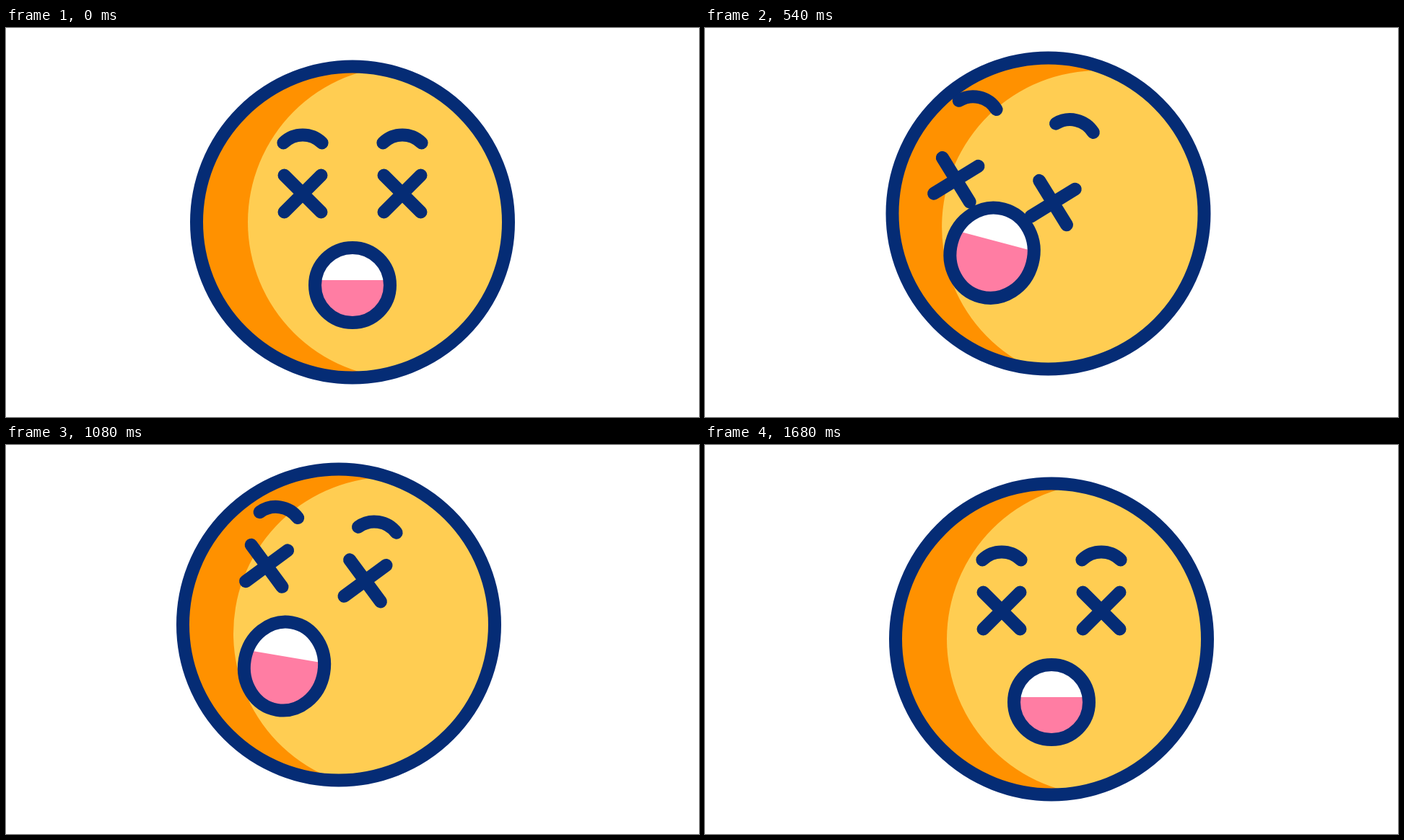
An HTML page with a canvas that plays this animation: 960x540 px, repeating every 1770 ms.

```html
<!DOCTYPE html>
<html lang="en">
<head>
<meta charset="utf-8">
<title>Dizzy face</title>
<style>
  html, body { margin: 0; width: 100%; height: 100%; overflow: hidden; background: #fff; }
  canvas { display: block; width: 960px; height: 540px; }
</style>
</head>
<body>
<canvas id="stage" width="960" height="540"></canvas>
<script>
const ctx = document.getElementById('stage').getContext('2d');
const NAVY = '#052c75', YELLOW = '#ffcd52', ORANGE = '#ff9100', PINK = '#ff7da3', WHITE = '#fff';
const LOOP = 1770, LAST_STEP = 37, WOUND = 6.8;
const RAD = Math.PI / 180, TAU = Math.PI * 2;

// The picture holds for 60, 40, 40 and 40 ms in turn.
function stepAt(ms) {
  const t = ms % LOOP, r = t % 180;
  const part = r < 60 ? 0 : 1 + Math.floor((r - 60) / 40);
  return Math.min(LAST_STEP, Math.floor(t / 180) * 4 + part);
}

function ease(n, from, to) {
  const u = Math.min(1, Math.max(0, (n - from) / (to - from)));
  return u * u * (3 - 2 * u);
}

// Offset that winds up, swings to the far side, then drifts back to zero.
function swing(n, wind, far, swingEnd, backStart, backEnd) {
  const out = ease(n, WOUND, swingEnd), back = ease(n, backStart, backEnd);
  return wind * (ease(n, 0, WOUND) - out) + far * (out - back);
}

function at(x, y, deg, draw) {
  ctx.save();
  ctx.translate(x, y);
  ctx.rotate(deg * RAD);
  draw();
  ctx.restore();
}

function ellipse(x, y, rx, ry) {
  ctx.beginPath();
  ctx.ellipse(x, y, rx, ry, 0, 0, TAU);
}

function fill(color) {
  ctx.fillStyle = color;
  ctx.fill();
}

function drawHead(turn) {
  ctx.save();
  ellipse(0, 0, 216, 216);
  fill(ORANGE);
  ctx.clip();
  ctx.rotate(turn * RAD);
  ellipse(72, 0, 217, 217);
  fill(YELLOW);
  ctx.restore();
  ellipse(0, 0, 216, 216);
  ctx.stroke();
}

function drawEye(x) {
  const s = 25.5;
  ctx.beginPath();
  ctx.moveTo(x - s, -s);
  ctx.lineTo(x + s, s);
  ctx.moveTo(x + s, -s);
  ctx.lineTo(x - s, s);
  ctx.stroke();
}

function drawBrow(x) {
  const r = 38, half = 44.5 * RAD;
  ctx.beginPath();
  ctx.arc(x, r - 11, r, -Math.PI / 2 - half, -Math.PI / 2 + half);
  ctx.stroke();
}

function drawMouth(n) {
  const open = (wind, far) => swing(n, wind, far, 13.3, 14, 35);
  const w = 52 + open(0, 6.4), h = 52 + open(-50.5, 18), tongue = -7 + open(6, -12);
  ctx.save();
  ellipse(0, 0, w, h);
  fill(WHITE);
  ctx.clip();
  ctx.fillStyle = PINK;
  ctx.fillRect(-w, tongue, 2 * w, 2 * h);
  ctx.restore();
  ellipse(0, 0, w, h);
  ctx.stroke();
}

function pair(draw) {
  draw(-69);
  draw(69);
}

function render(n) {
  const move = (...path) => swing(n, ...path);
  const turn = move(3.9, 19.1, 14.8, 15, 33), tilt = turn * 0.9;

  ctx.fillStyle = WHITE;
  ctx.fillRect(0, 0, 960, 540);
  ctx.strokeStyle = NAVY;
  ctx.lineWidth = 18;
  ctx.lineCap = 'round';

  // Sideways the face runs ahead of the head; the mouth is last to settle.
  at(480 + move(37, -35.7, 16.3, 15.1, 33.7), 269.5 + move(22.3, -37.7, 16.3, 15.1, 33.7), 0,
    () => drawHead(turn));
  at(480 + move(52, -111, 14.8, 13, 33.8), 230 + move(59.7, -61, 16.9, 21.2, 32.7), tilt,
    () => pair(drawEye));
  at(480 + move(61, -73, 14.8, 13, 34), 159.5 + move(35.3, -85, 16, 17.2, 33.2), tilt,
    () => pair(drawBrow));
  at(480 + move(35, -128.5, 14.8, 18.2, 35.4), 357 + move(0, -78.5, 16.3, 16.9, 34.3), turn,
    () => drawMouth(n));
}

let start;
function tick(now) {
  if (start === undefined) start = now;
  render(stepAt(Math.max(0, now - start)));
  requestAnimationFrame(tick);
}
render(0);
requestAnimationFrame(tick);
</script>
</body>
</html>
```
